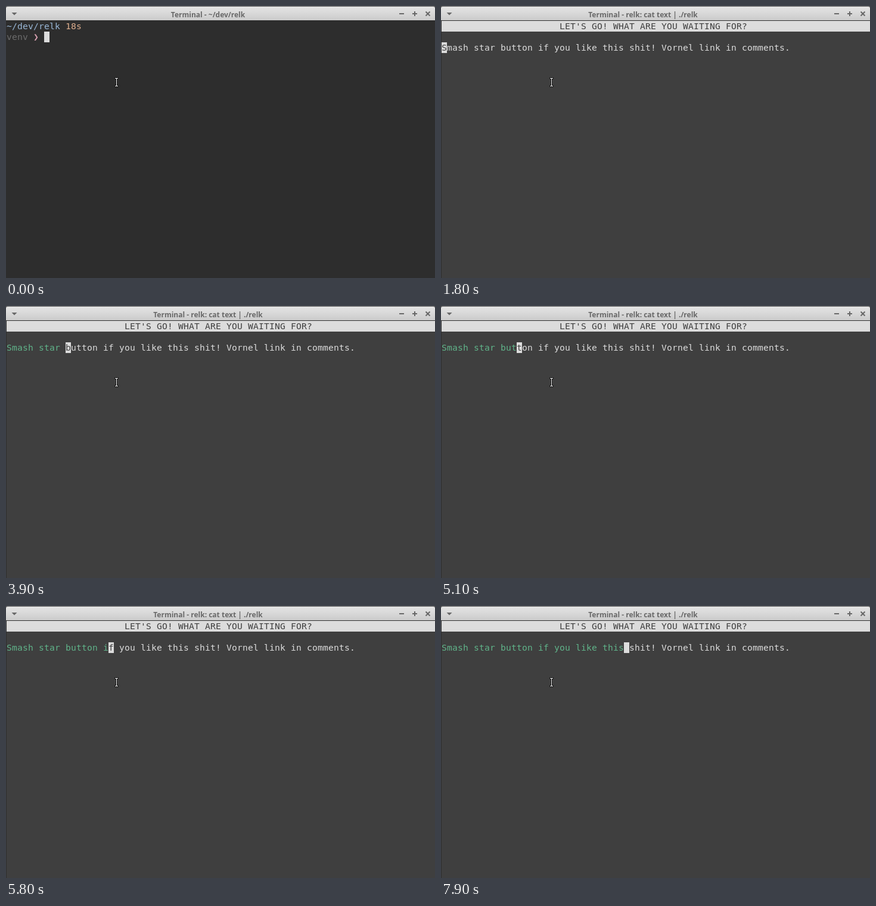
Write an HTML page with a canvas that moves like this. It is 720 px wide and 457 px high and loops after 8 s.

```html
<!DOCTYPE html>
<html lang="en">
<head>
<meta charset="utf-8">
<title>Terminal</title>
<style>
  html, body { margin: 0; width: 100%; height: 100%; overflow: hidden; background: #2d2d2d; }
  canvas { display: block; }
</style>
</head>
<body>
<canvas id="stage" width="720" height="457"></canvas>
<script>
const ctx = document.getElementById("stage").getContext("2d", { alpha: false });
const LOOP = 8000, CELL = 9, ROW = 18, TOP = 25;
const SHELL = "#2d2d2d", PAGE = "#3f3f3f", LIGHT = "#dcdcdc", GREEN = "#60b48a", ICON = "#686868";
const COMMAND = "cat text | ./relk";
const HEADING = "LET'S GO! WHAT ARE YOU WAITING FOR?";
const LESSON = "Smash star button if you like this shit! Vornel link in comments.";

// Key times in tenths of a second
const typed = [24, 26, 27, 29, 30, 31, 33, 35, 36, 37, 39, 46, 48, 49, 51, 53, 54, 55, 56,
  58, 60, 61, 64, 65, 66, 67, 69, 70, 72, 73, 75, 76, 77, 79, 79];
const erased = [44];
const countUntil = (times, t) => times.filter(k => k * 100 <= t).length;

function box(x, y, w, h, color) {
  ctx.fillStyle = color;
  ctx.fillRect(x, y, w, h);
}

function print(text, col, row, color) {
  ctx.font = '11pt "DejaVu Sans Mono", monospace';
  ctx.textAlign = "left";
  ctx.fillStyle = color;
  [...text].forEach((c, i) => ctx.fillText(c, 1 + (col + i) * CELL, TOP + row * ROW + 14));
}

function caret(col, row) {
  box(1 + col * CELL, TOP + row * ROW, CELL, ROW, LIGHT);
}

function line(x1, y1, x2, y2) {
  ctx.beginPath();
  ctx.moveTo(x1, y1);
  ctx.lineTo(x2, y2);
  ctx.strokeStyle = ICON;
  ctx.lineWidth = 2;
  ctx.stroke();
}

function titleBar(title) {
  const shade = ctx.createLinearGradient(0, 0, 0, 24);
  shade.addColorStop(0, "#e6e6e6");
  shade.addColorStop(1, "#cbcbcb");
  box(0, 0, 720, 24, "#555");
  ctx.fillStyle = shade;
  ctx.beginPath();
  ctx.roundRect(0, 1, 720, 23, [3, 3, 0, 0]);
  ctx.fill();

  ctx.font = 'bold 12px "Open Sans", sans-serif';
  ctx.textAlign = "center";
  ctx.fillStyle = ICON;
  ctx.fillText(title, 339, 19);

  ctx.beginPath();
  ctx.moveTo(9.5, 11);
  ctx.lineTo(18.5, 11);
  ctx.lineTo(14, 15.5);
  ctx.fill();
  box(660, 12, 8, 2, ICON);
  box(682, 12, 8, 2, ICON);
  box(685, 9, 2, 8, ICON);
  line(704.5, 9.5, 711.5, 16.5);
  line(711.5, 9.5, 704.5, 16.5);
}

function pointer() {
  box(182, 120, 7, 3, "#111");
  box(182, 133, 7, 3, "#111");
  box(184, 121, 3, 14, "#111");
  box(183, 121, 5, 1, "#fff");
  box(183, 134, 5, 1, "#fff");
  box(185, 121, 1, 14, "#fff");
}

function shell(t) {
  print("~/dev/relk", 0, 0, "#9ab8d7");
  print("18s", 11, 0, "#dfaf8f");
  print("venv", 0, 1, "#6c6c6c");
  print("❯", 5, 1, "#d7a0b0");
  if (t >= 400) print(COMMAND, 7, 1, LIGHT);
  if (t >= 1700) caret(0, 2);
  else caret(t < 400 ? 7 : 7 + COMMAND.length, 1);
}

function lesson(t) {
  box(1, TOP, 719, 457 - TOP, PAGE);
  if (t >= 5400 && t < 5500) return; // screen is cleared before a redraw
  box(1, TOP, 719, ROW, LIGHT);
  print(HEADING, 22, 0, PAGE);
  const at = countUntil(typed, t) - countUntil(erased, t);
  print(LESSON.slice(0, at), 0, 2, GREEN);
  print(LESSON.slice(at + 1), at + 1, 2, LIGHT);
  caret(at, 2);
  print(LESSON[at], at, 2, PAGE);
}

function draw(now) {
  const t = now % LOOP;
  box(0, 0, 720, 457, SHELL);
  titleBar("Terminal - " + (t < 1700 ? "~/dev/relk" : "relk: " + COMMAND));
  (t < 1800 ? shell : lesson)(t);
  pointer();
  requestAnimationFrame(draw);
}
requestAnimationFrame(draw);
</script>
</body>
</html>
```
